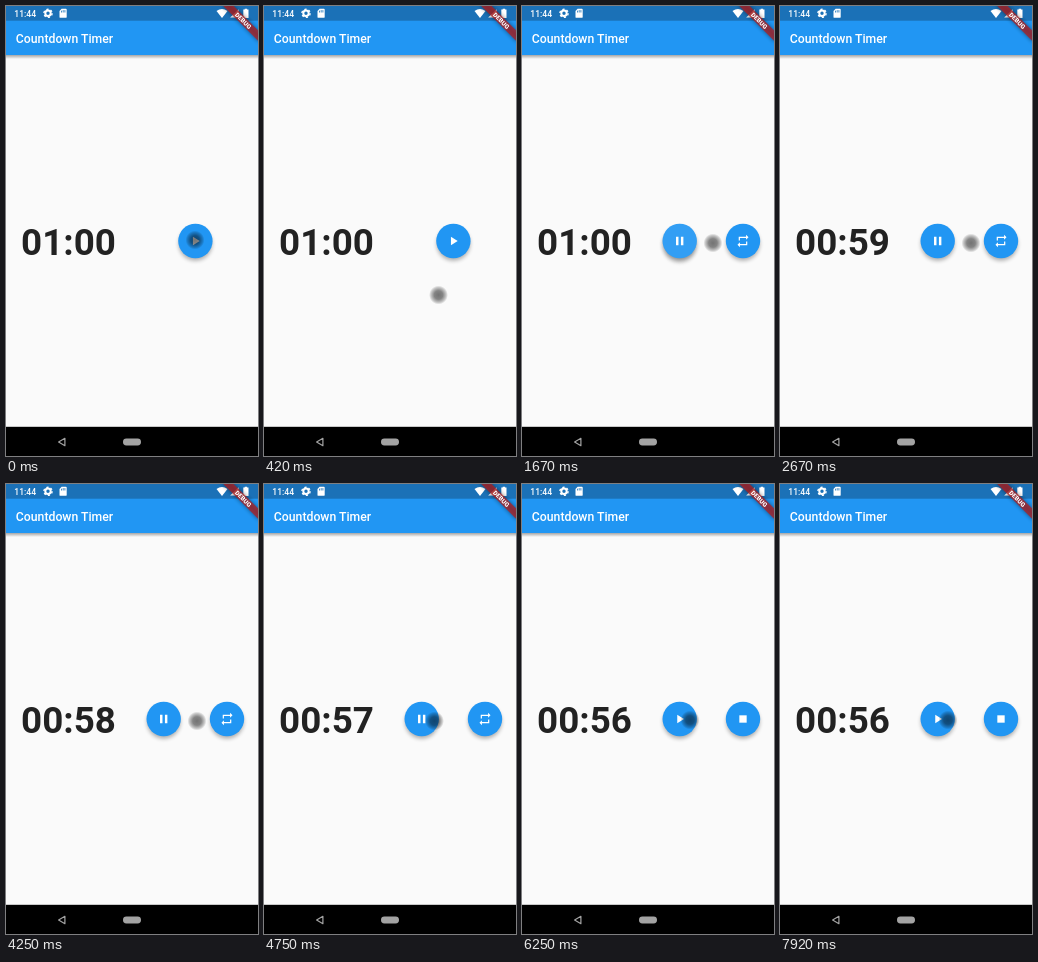
Write an HTML page that moves like this. It is 252 by 450 pixels and loops after 8000 ms.

```html
<!DOCTYPE html>
<html lang="en">
<head>
<meta charset="utf-8">
<title>Countdown Timer</title>
<style>
  html, body { margin: 0; width: 100%; height: 100%; overflow: hidden; background: #fafafa; }
  svg { display: block; width: 100%; height: 100%; font-family: Roboto, sans-serif; }
</style>
</head>
<body>
<svg viewBox="0 0 252 450">
  <defs>
    <radialGradient id="touch">
      <stop offset="0" stop-color="#000" stop-opacity=".54"/>
      <stop offset=".45" stop-color="#000" stop-opacity=".47"/>
      <stop offset=".8" stop-color="#000" stop-opacity=".2"/>
      <stop offset="1" stop-color="#000" stop-opacity="0"/>
    </radialGradient>
    <linearGradient id="fade" x2="0" y2="1">
      <stop offset="0" stop-opacity=".34"/>
      <stop offset="1" stop-opacity="0"/>
    </linearGradient>
    <filter id="soft" x="-50%" y="-50%" width="200%" height="200%">
      <feGaussianBlur stdDeviation="2.3"/>
    </filter>
    <g id="disc">
      <circle cy="3" r="16.6" opacity=".32" filter="url(#soft)"/>
      <circle r="17.2" fill="#2196f3"/>
    </g>
  </defs>

  <rect width="252" height="450" fill="#fafafa"/>
  <rect y="49" width="252" height="4" fill="url(#fade)"/>
  <rect width="252" height="49" fill="#2196f3"/>
  <rect width="252" height="14.7" fill="#1b71b7"/>
  <text x="9.8" y="36.6" font-size="12.26" font-weight="500" fill="#fff">Countdown Timer</text>

  <g fill="#fff">
    <text x="8.3" y="10.6" font-size="8.6" font-weight="500">11:44</text>
    <g transform="translate(42 7.3)">
      <circle r="2.7" fill="none" stroke="#fff" stroke-width="2"/>
      <circle r="4.1" fill="none" stroke="#fff" stroke-width="1.4" stroke-dasharray="2.15 2.143"/>
    </g>
    <path d="M55.6 2.8h4.2q.9 0 .9.9v7.2q0 .9-.9.9h-5.4q-.9 0-.9-.9V5z"/>
    <path d="M55.5 4.7v1.8M57.2 4.1v2.4M58.9 4.1v2.4" stroke="#1b71b7" stroke-width=".8"/>
    <path d="M210.5 5Q216 .8 221.5 5L216 12z"/>
    <path d="M224.2 11.6L232.6 3.2V11.6z"/>
    <path d="M237.3 3.6h1.4v-.9h2.4v.9h1.4v8.4h-5.2z"/>
  </g>

  <g transform="translate(252 0) rotate(45)">
    <rect x="-26" y="17.2" width="52" height="7.35" opacity=".45" filter="url(#soft)"/>
    <rect x="-26" y="17.2" width="52" height="7.35" fill="#b71c1c" fill-opacity=".72"/>
    <text y="23.1" font-size="6.25" font-weight="900" fill="#fff" text-anchor="middle">DEBUG</text>
  </g>

  <rect y="420.8" width="252" height="30" fill="#000"/>
  <path d="M58.9 432.3v7.4l-6.3-3.7z" fill="none" stroke="#a3a3a3" stroke-width="1.2" stroke-linejoin="round"/>
  <rect x="117" y="432.6" width="18" height="6.8" rx="3.4" fill="#a3a3a3"/>

  <text id="clock" x="62.5" y="248.5" font-size="36.8" font-weight="700" fill="#222" text-anchor="middle"></text>
  <g id="first"></g>
  <g id="second"></g>
  <circle id="pointer" r="9.5" fill="url(#touch)"/>
</svg>
<script>
const LOOP = 8000, START = 1670, PAUSE = 5830;
const $ = id => document.getElementById(id);

const icons = {
  play: 'M8 5v14l11-7z',
  pause: 'M6 19h4V5H6zM14 5v14h4V5z',
  stop: 'M6 6h12v12H6z',
  repeat: 'M7 7h10v3l4-4-4-4v3H5v6h2zM17 17H7v-3l-4 4 4 4v-3h12v-6h-2z'
};

// Pointer path: time, x, y
const path = [
  [0, 189, 234], [80, 189, 234], [400, 174.5, 289], [480, 174.5, 289],
  [830, 190, 237], [1250, 190, 237], [1750, 191, 237], [4380, 191, 237],
  [4750, 170.5, 237], [5170, 161, 236], [5250, 161, 236], [5420, 168, 236], [LOOP, 168, 236]
];

const clamp = v => Math.max(0, Math.min(1, v));
const ease = v => v * v * (3 - 2 * v);

function pointerAt(t) {
  const i = path.findIndex(p => p[0] > t);
  const [t0, x0, y0] = path[i - 1], [t1, x1, y1] = path[i];
  const k = ease((t - t0) / (t1 - t0));
  return [x0 + (x1 - x0) * k, y0 + (y1 - y0) * k];
}

// Raised shadow while a button is held, then released
const press = (t, down, up) => clamp((t - down) / 150) * clamp((up - t) / 100);

function button(x, icon, lift = 0) {
  return `<g transform="translate(${x} 235)">
    <circle cy="5" r="16.6" opacity="${lift * 0.2}" filter="url(#soft)"/>
    <use href="#disc"/>
    <circle r="17.2" fill="#fff" opacity="${lift * 0.1}"/>
    <path d="${icons[icon]}" fill="#fff" transform="scale(.613) translate(-12 -12)"/></g>`;
}

function draw(t) {
  const ticks = [2670, 3540, 4670, 5670].filter(at => t >= at).length;
  $('clock').textContent = ticks ? '00:' + (60 - ticks) : '01:00';

  if (t < START) {
    $('first').innerHTML = button(189.4, 'play', press(t, 1290, 1750));
    $('second').innerHTML = '';
  } else {
    const paused = t >= PAUSE;
    const lift = paused ? press(t, 5700, 6000) : press(t, 1290, 1750);
    $('first').innerHTML = button(157.7, paused ? 'play' : 'pause', lift);
    $('second').innerHTML = button(221, paused ? 'stop' : 'repeat');
  }

  const [x, y] = pointerAt(t);
  $('pointer').setAttribute('transform', `translate(${x} ${y})`);
}

const begin = performance.now();
function frame() {
  draw((performance.now() - begin) % LOOP);
  requestAnimationFrame(frame);
}
draw(0);
requestAnimationFrame(frame);
</script>
</body>
</html>
```
